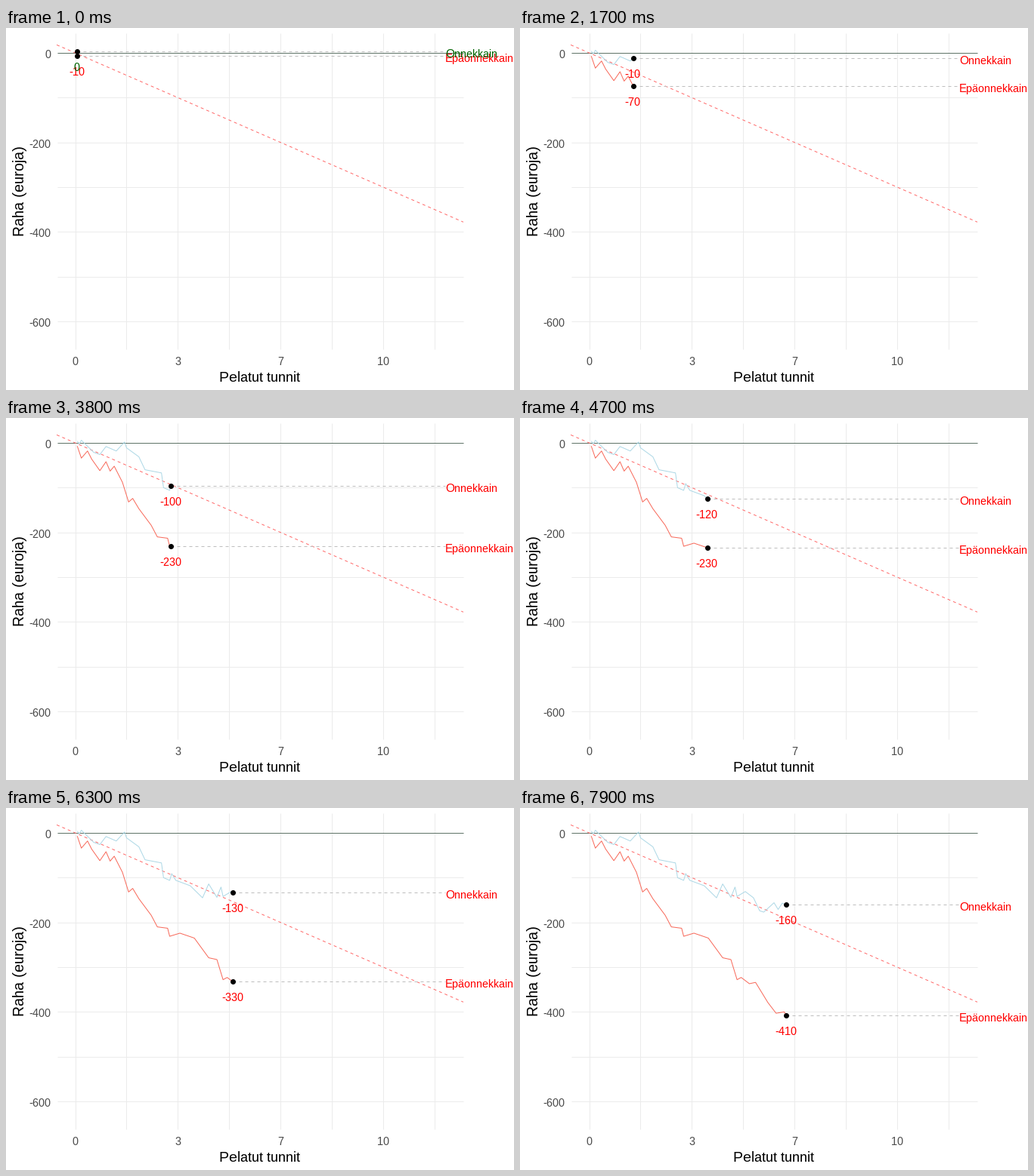
These frames come from a looping animation (672 by 480 pixels, 8 s). A matplotlib script:

```python
import numpy as np
import matplotlib.pyplot as plt
from matplotlib.animation import FuncAnimation

W, H, DPI = 672, 480, 96
FRAMES, INTERVAL = 80, 100
PX = 72 / DPI                      # one pixel in points
ROUNDS_PER_FRAME = 179 / 149
LEFT, RIGHT, TOP, BOTTOM = 68, 605, 7, 426

plt.rcParams.update({
    "font.family": "Liberation Sans",
    "text.hinting": "native",
    "text.hinting_factor": 1,
})

# Turning points of each balance: (round, euros)
LUCKY = [
    (1, 4), (2, -2), (3, 6), (9, -21), (12, -26), (15, -8), (20, -18),
    (24, 2), (25, -11), (31, -31), (34, -60), (42, -67), (43, -100),
    (46, -106), (47, -91), (49, -106), (56, -118), (62, -145), (65, -114),
    (69, -144), (71, -121), (72, -142), (76, -131), (80, -145), (83, -174),
    (85, -177), (90, -156), (92, -171), (94, -157), (96, -161),
]
UNLUCKY = [
    (1, -7), (3, -34), (6, -18), (8, -36), (12, -62), (15, -42), (17, -63),
    (19, -52), (23, -88), (26, -132), (28, -124), (31, -147), (37, -184),
    (40, -210), (45, -213), (46, -231), (51, -224), (58, -235), (65, -279),
    (69, -283), (72, -328), (74, -323), (78, -337), (81, -334), (87, -379),
    (91, -403), (95, -400), (96, -408),
]


def to_x(rounds):
    return 91.55 + 2.7165 * np.asarray(rounds)


def to_y(euros):
    return 33.05 - 0.5933 * np.asarray(euros)


fig = plt.figure(figsize=(W / DPI, H / DPI), dpi=DPI, facecolor="white")
ax = fig.add_axes([0, 0, 1, 1])
ax.set(xlim=(0, W), ylim=(H, 0))
ax.axis("off")


def line(xs, ys, color, z, dashed=False):
    style = (0, (4, 4)) if dashed else "-"
    return ax.plot(xs, ys, color=color, lw=PX, ls=style, zorder=z,
                   dash_capstyle="butt", solid_capstyle="butt")[0]


def label(x, y, text, size=15, color="#4D4D4D", **kw):
    return ax.text(x, y, text, fontsize=size * PX, color=color,
                   va="baseline", zorder=9, **kw)


# Grid and tick labels
for r in range(0, 176, 25):
    line([to_x(r)] * 2, [TOP, BOTTOM], "#EBEBEB", 1)
    if r % 50 == 0:
        label(to_x(r), 447, f"{r / 15:.0f}", ha="center")
for v in range(0, -601, -100):
    line([LEFT, RIGHT], [to_y(v)] * 2, "#EBEBEB", 1)
    if v % 200 == 0:
        label(59, to_y(v) + 7, str(v), ha="right")

label(336, 469, "Pelatut tunnit", 19, "black", ha="center")
label(24, 215.5, "Raha (euroja)", 20, "black", ha="center", rotation=90,
      rotation_mode="anchor")

# Break-even line and expected loss of two euros per round
line([LEFT, RIGHT], [to_y(0)] * 2, "#5F7468", 2)
ends = np.array([-9, 189])
line(to_x(ends), to_y(-2 * ends), "#FF6A6A", 2, dashed=True)


class Player:
    def __init__(self, name, turns, color):
        self.rounds, self.money = np.array(turns, float).T
        self.path = line([], [], color, 3)
        self.guide = line([], [], "#BEBEBE", 4, dashed=True)
        self.dot, = ax.plot([], [], "o", color="black", ms=7 * PX, mew=0,
                            zorder=5)
        self.name = label(581, 0, name)
        self.amount = label(0, 0, "", ha="center")

    def show(self, now):
        value = np.interp(now, self.rounds, self.money)
        past = self.rounds < now
        x, y = to_x(now), to_y(value)
        self.path.set_data(to_x(np.append(self.rounds[past], now)),
                           to_y(np.append(self.money[past], value)))
        self.guide.set_data([x, to_x(180)], [y, y])
        self.dot.set_data([x], [y])

        color = "darkgreen" if value >= 0 else "red"
        self.name.set(y=y + 8, color=color)
        self.amount.set(position=(x - 0.5, y + 26), color=color,
                        text=str(int(round(value / 10)) * 10))
        return self.path, self.guide, self.dot, self.name, self.amount


players = [Player("Epäonnekkain", UNLUCKY, "#F8695A"),
           Player("Onnekkain", LUCKY, "lightblue")]


def draw(frame):
    now = 1 + frame * ROUNDS_PER_FRAME
    return [artist for p in players for artist in p.show(now)]


anim = FuncAnimation(fig, draw, frames=FRAMES, interval=INTERVAL,
                     repeat=True, repeat_delay=0)
plt.show()
```
